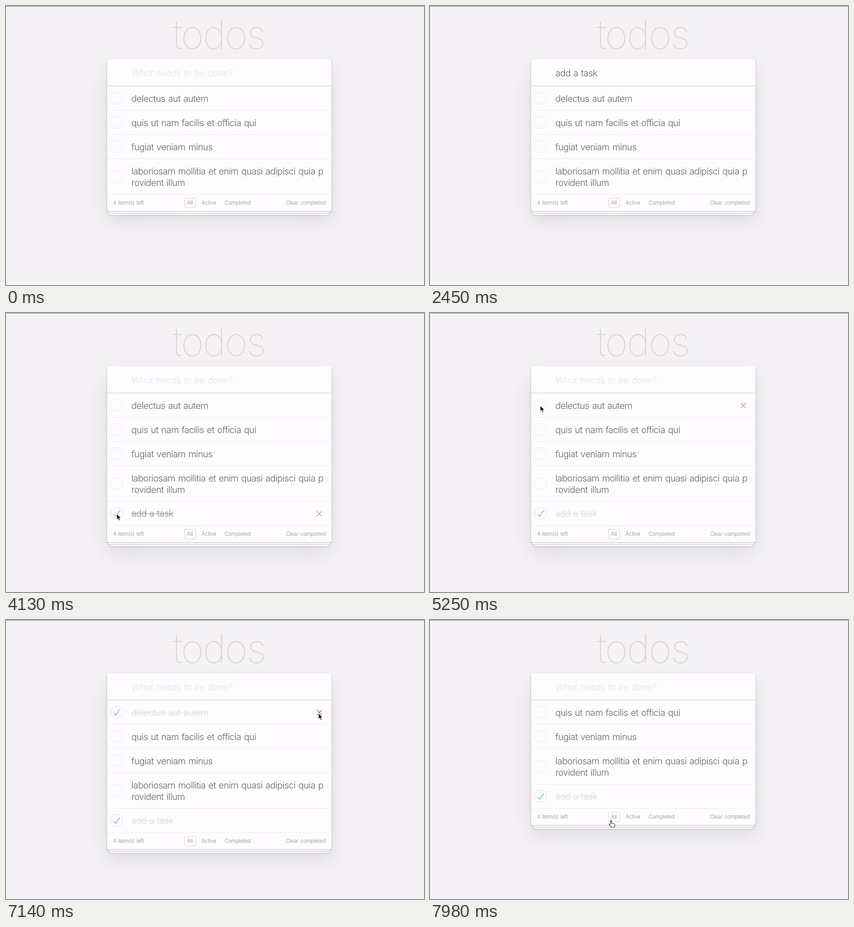
An HTML page for the animation above (8000 ms loop, 917x611 px).

```html
<!DOCTYPE html>
<html lang="en">
<head>
<meta charset="utf-8">
<title>todos</title>
<style>
html, body { margin: 0; width: 100%; height: 100%; overflow: hidden; background: #f4f2f5; }
body {
  position: relative; color: #666; white-space: pre; cursor: default;
  font: 300 20px/25.2px Inter, "Liberation Sans", sans-serif;
  font-optical-sizing: none; letter-spacing: -.6px; word-spacing: 1.3px;
}
#bar { position: absolute; top: 0; width: 100%; height: 1px; background: #77757a; }
h1 {
  position: absolute; left: 221px; top: 12.9px; width: 492px; margin: 0; text-align: center;
  font-size: 87px; line-height: 100px; font-weight: 100; letter-spacing: -.028em; color: #e4cbcd;
}
#card {
  position: absolute; left: 222px; top: 117.3px; width: 492.3px; background: #fefcff;
  box-shadow: 0 1px 1px #0003, 0 7px 0 -2.7px #f8f6f9, 0 8px 1px -2.7px #0003,
    0 14.3px 0 -5.4px #f8f6f9, 0 15.2px 2px -5.4px #0003,
    0 1.8px 3.6px #0003, 0 22px 45px #0000001a;
}
#entry, .item { position: relative; box-sizing: border-box; padding-left: 53px; }
#entry {
  height: 58.7px; padding-top: 17.3px;
  border-bottom: 1px solid #dddbde; box-shadow: inset 0 -2px 1px #00000008;
}
#hint { position: absolute; left: 53px; font-style: italic; letter-spacing: -.45px; color: #e6e4e7; }
#caret { display: inline-block; width: 1px; height: 25px; margin-right: -1px; vertical-align: top; background: #555; }
.item { height: 53px; padding-top: 14.7px; border-bottom: 1px solid #edebee; }
.item.tall { height: 77.7px; }
.item[hidden] { display: none; }
.check { position: absolute; left: 6.7px; top: calc(50% - 13.8px); width: 27.6px; height: 27.6px; }
.check circle { fill: none; stroke: #e6e4e7; stroke-width: 3; }
.check path { fill: #5dc2af; visibility: hidden; }
.done circle { stroke: #bddad5; }
.done .check path { visibility: visible; }
.done span { text-decoration: line-through; text-decoration-thickness: 1.4px; }
.cross {
  position: absolute; left: 459.5px; top: calc(50% - 5px); width: 11px; height: 11px;
  overflow: visible; stroke: #c48f92; stroke-width: 1.3;
}
footer {
  position: relative; height: 36.3px; font-size: 11.5px; line-height: 36px;
  letter-spacing: -.01em; word-spacing: 1px; color: #8a888b;
}
footer span { position: absolute; top: .5px; }
#all {
  position: absolute; left: 168.5px; top: 7px; width: 24px; height: 20px;
  border: 1px solid #e0cfd0; border-radius: 3px;
}
#pointer { position: absolute; left: 0; top: 0; width: 1px; height: 1px; overflow: visible; }
</style>
</head>
<body>
<div id="bar"></div>
<h1>todos</h1>
<div id="card"><div id="entry"><span id="hint">What needs to be done?</span><span id="typed"></span><i id="caret"></i></div><div id="list"></div><footer><span style="left:13px">4 item(s) left</span><div id="all"></div><span style="left:175px">All</span><span style="left:207px">Active</span><span style="left:257.5px">Completed</span><span style="right:13px">Clear completed</span></footer></div>
<svg id="pointer">
  <path id="arrow" d="M0 0V12.5L2.9 9.8 5 14.6 7.2 13.6 5.1 9H9Z" stroke="#fff" stroke-width=".9"/>
  <path id="beam" d="M-3-9Q0-9 0-7V7Q0 9-3 9M3-9Q0-9 0-7M0 7Q0 9 3 9" fill="none" stroke="#555"/>
  <path id="hand" d="M-1 8V1a1.2 1.2 0 0 1 2.4 0V6l5 1q2 .5 2 2.5L7.5 15H1L-3.6 9.5Q-4.2 8-2.8 7.6Z" fill="#fff" stroke="#333" stroke-width="1.2"/>
</svg>
<script>
const LOOP = 8000, STEP = 70;
const ENTER = 2660, REMOVE = 7280;
const LIST_TOP = 176, ROW = 53, TALL_ROW = 77.7;
const TASK = 'add a task';
const keyTimes = [840, 980, 1050, 1190, 1330, 1470, 1680, 1750, 1890, 2100];
const caretSpans = [[700, 2450], [ENTER, 3150], [3710, 3990]];
const pointerSpans = [[70, 840], [2870, LOOP]];
// Pointer stops: time, x, y
const stops = [
  [70, 450, 298], [420, 447, 147], [840, 447, 147],
  [2870, 446, 132], [3080, 405, 290], [3360, 319, 442], [3500, 238, 442], [3640, 325, 442],
  [3990, 243, 440], [4340, 243, 440], [5180, 241, 201], [5250, 242, 203],
  [5600, 242, 203], [5740, 320, 314], [5950, 458, 217], [6020, 458, 217],
  [6510, 687, 208], [6720, 687, 208], [6860, 685, 205], [7420, 686, 204],
  [7700, 560, 380], [7840, 420, 461], [7910, 364, 455], [7980, 397, 439]
];
const tasks = [
  { text: 'delectus aut autem', done: 5530, to: REMOVE },
  { text: 'quis ut nam facilis et officia qui' },
  { text: 'fugiat veniam minus' },
  { text: 'laboriosam mollitia et enim quasi adipisci quia p\nrovident illum', tall: true },
  { text: TASK, from: ENTER, done: 4130 }
];

const $ = id => document.getElementById(id);
const show = (el, on) => { el.style.visibility = on ? 'visible' : 'hidden'; };
const within = (spans, t) => spans.some(([a, b]) => t >= a && t < b);

for (const task of tasks) {
  const el = task.el = document.createElement('div');
  el.innerHTML = `<svg class="check" viewBox="-2 -2 104 104"><circle cx="50" cy="50" r="50"/>
<path d="M72 25L42 71 27 56l-4 4 20 20 34-52z"/></svg><span>${task.text}</span>` +
    '<svg class="cross"><path d="M0 0L11 11M11 0L0 11"/></svg>';
  $('list').append(el);
}

function pointerAt(t) {
  const i = stops.findIndex(s => s[0] > t);
  if (i < 1) return stops[i ? stops.length - 1 : 0].slice(1);
  const [t0, x0, y0] = stops[i - 1], [t1, x1, y1] = stops[i];
  const k = (t - t0) / (t1 - t0);
  return [x0 + (x1 - x0) * k, y0 + (y1 - y0) * k];
}

function render(t) {
  const [x, y] = pointerAt(t);
  const visible = within(pointerSpans, t);
  const typed = t < ENTER ? TASK.slice(0, keyTimes.filter(k => k <= t).length) : '';
  $('typed').textContent = typed;
  show($('hint'), !typed);
  show($('caret'), within(caretSpans, t));

  let top = LIST_TOP;
  for (const { el, tall, from = 0, to = LOOP, done = LOOP } of tasks) {
    el.hidden = t < from || t >= to;
    if (el.hidden) continue;
    const bottom = top + (tall ? TALL_ROW : ROW);
    const checked = t >= done;
    const fade = checked ? Math.min(1, (t - done + 70) / 210) : 0;
    const grey = Math.round(102 + 115 * fade);
    el.className = 'item' + (tall ? ' tall' : '') + (checked ? ' done' : '');
    el.style.color = `rgb(${grey},${grey},${grey})`;
    const cross = el.querySelector('.cross');
    show(cross, visible && y >= top && y < bottom);
    cross.style.stroke = x > 678 && t >= 6510 ? '#af5b5e' : '';
    top = bottom;
  }

  const onLink = x > 390 && x < 417 && y > top + 5 && y < top + 30;
  const inEntry = y < LIST_TOP;
  $('all').style.borderColor = onLink ? '#dedadd' : '';
  $('pointer').style.transform = `translate(${x}px,${y}px)`;
  show($('beam'), visible && inEntry);
  show($('hand'), visible && onLink);
  show($('arrow'), visible && !inEntry && !onLink);
}

function frame() {
  const t = performance.now() % LOOP;
  render(Math.floor(t / STEP) * STEP);
  requestAnimationFrame(frame);
}
frame();
</script>
</body>
</html>
```
